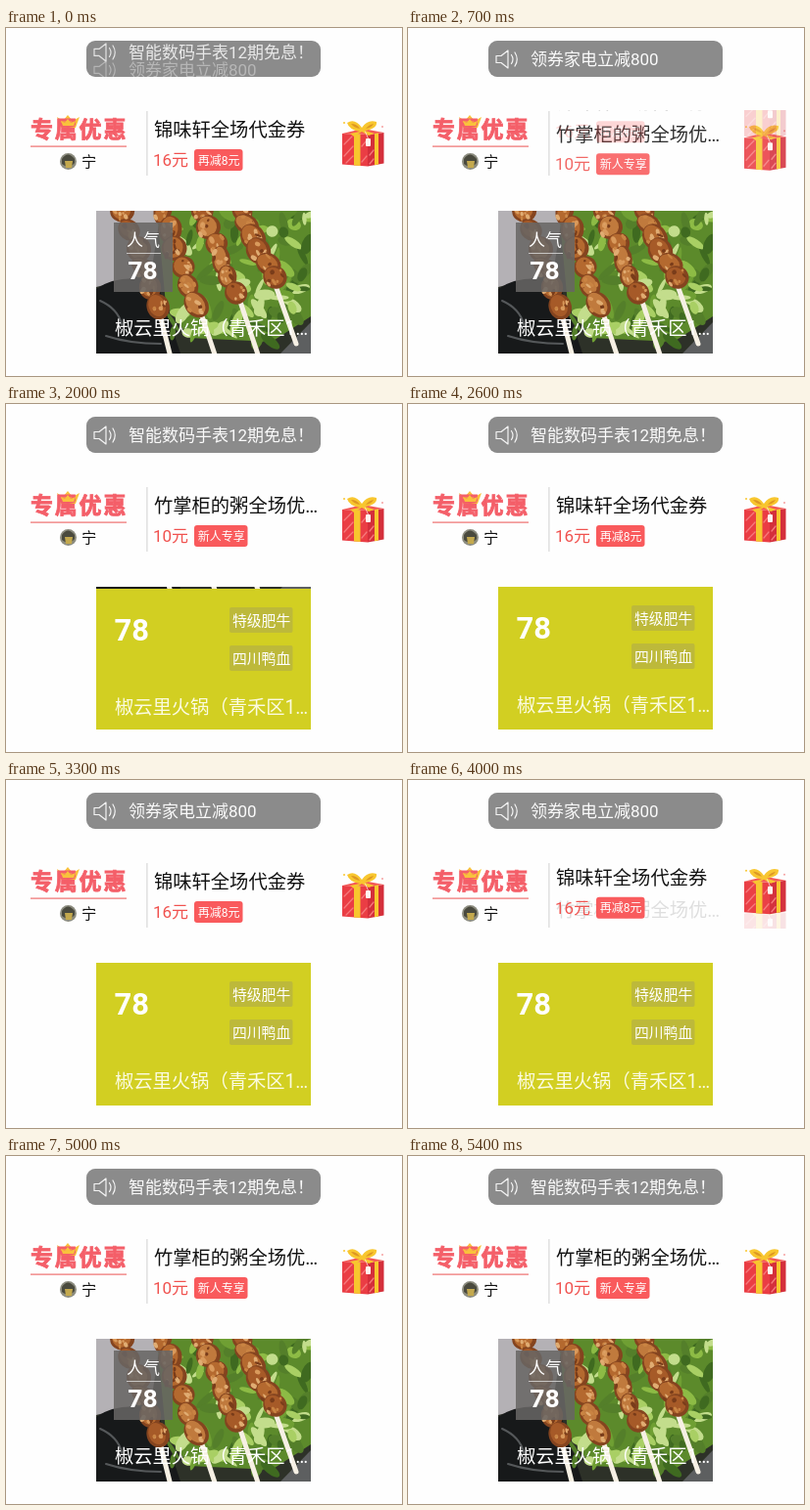
An HTML page for the animation above (5.5 s loop, 404x356 px).

```html
<!DOCTYPE html>
<html lang="zh-CN">
<head>
<meta charset="utf-8">
<title>Vertical flippers</title>
<style>
html, body { margin: 0; width: 100%; height: 100%; overflow: hidden; background: #fefefe; }
svg { display: block; }
text { font-family: Roboto, "Noto Sans CJK SC", "Noto Sans CJK", sans-serif; white-space: pre; }
</style>
</head>
<body>
<svg id="stage" width="404" height="356" viewBox="0 0 404 356"></svg>
<script>
const LOOP = 5500, STEP = 100;

const text = (x, y, size, fill, str, extra = '') =>
  `<text x="${x}" y="${y}" font-size="${size}" fill="${fill}" ${extra}>${str}</text>`;
const rect = (x, y, w, h, fill, r = 0) =>
  `<rect x="${x}" y="${y}" width="${w}" height="${h}" rx="${r}" fill="${fill}"/>`;
const path = (d, fill, extra = '') => `<path d="${d}" fill="${fill}" ${extra}/>`;
const line = (d, stroke, width) =>
  path(d, 'none', `stroke="${stroke}" stroke-width="${width}" stroke-linecap="round" stroke-linejoin="round"`);
const blob = (x, y, rx, ry, fill, turn = 0) =>
  `<ellipse rx="${rx}" ry="${ry}" fill="${fill}" transform="translate(${x} ${y}) rotate(${turn})"/>`;
const group = (items) => items.map(s => `<g>${s}</g>`).join('');
const clip = (id, x, y, w, h, r = 0) =>
  `<clipPath id="${id}">${rect(x, y, w, h, '#000', r)}</clipPath>`;

let seed = 7;
const rnd = (lo, hi) => {
  seed = (seed * 16807) % 2147483647;
  return lo + (hi - lo) * seed / 2147483647;
};
const pick = list => list[Math.floor(rnd(0, list.length))];

const notice = (str) =>
  line('M90 28.5h5l7-5.5v18l-7-5.5h-5z', '#f4f4f4', 1.2) +
  line('M105.5 27.5q3 4.5 0 9M109 25q4.5 7 0 14', '#f4f4f4', 1.2) +
  text(125, 38.3, 17, '#fafafa', str);

function gift() {
  const gold = '#f8c62e';
  return path('M343 108l26 1v32.5l-26-2z', '#ea3d44') +
    path('M369 109l16.5-2v31.5l-16.5 3z', '#d42f3b') +
    path('M343 108l21-5 21.5 4-16.5 2z', '#f45855') +
    line('M345 119l8-8M345 131l9-10M347 138l7-7M363 121l5-6M363 137l5-6M371 130l4-5M371 139l4-5', '#f5797c', 1.3) +
    path('M355 108.5h6.5v32.4l-6.5-.5zM376 108l4-.5v32l-4 .7z', gold) +
    path('M361 106q-11-2-13-9 8-5 15 5 6-9 15-6 1 7-12 9l10 3-6 2-7-4-8 5-4-3z', gold) +
    path('M352 98q6 0 9 5-6-1-9-5zM375 98q-5 1-8 5 6-1 8-5z', '#dd9623') +
    rect(367, 113, 5, 8, '#fff4ef', 1) +
    line('M369.5 113l-3-7', '#fff4ef', .7) +
    `<circle cx="345" cy="97" r="1" fill="${gold}"/><circle cx="384" cy="101" r="1" fill="#f4a0a0"/>`;
}

const coupon = (title, price, tag, tagWidth) =>
  text(151, 111.3, 19.3, '#111', title) +
  text(150, 141, 17, '#f0524f', price) +
  rect(192, 124, tagWidth, 22, '#f95a5c', 3) +
  text(195.7, 139.6, 12, '#fff', tag) + gift();

// Lumps of grilled meat on pale sticks: meat start, meat end, stick end.
function skewers() {
  const rows = [
    [26, 0, 63, 98, 76, 150], [66, 0, 104, 96, 122, 150],
    [106, 0, 144, 84, 166, 150], [148, 0, 180, 68, 204, 136]
  ];
  let out = '';
  for (const [x0, y0, x1, y1, x2, y2] of rows) {
    out += line(`M${x1} ${y1}L${x2} ${y2}`, '#f6f0e4', 5);
    const lean = Math.atan2(y1 - y0, x1 - x0) * 180 / Math.PI;
    for (let k = 0; k < 6; k++) {
      const x = x0 + (x1 - x0) * k / 5 + rnd(-3, 3), y = y0 + (y1 - y0) * k / 5;
      const turn = lean + rnd(-35, 35), rx = rnd(11, 15), ry = rnd(9, 13);
      out += blob(x, y, rx, ry, '#84441f', turn) +
        blob(x - 1, y - 1, rx - 2, ry - 3, pick(['#b4692f', '#a65a28', '#c07a3d']), turn);
      for (let j = 0; j < 7; j++)
        out += blob(x + rnd(-8, 8), y + rnd(-8, 8), rnd(1, 4), rnd(1, 2.5),
          pick(['#d99a5c', '#c98443', '#793c1a', '#e0ac72']), turn + rnd(-40, 40));
    }
  }
  return out;
}

function plate() {
  let out = rect(0, 0, 219, 146, '#2d3128') +
    path('M0 0h66l-10 64-56 14z', '#b4b1b5') +
    path('M0 80q22-16 62-8l24 74H0z', '#17191a') +
    line('M4 92q18 8 22 24M10 128q24 8 56 8', '#55585a', 2) +
    path('M62 0h157v108l-40 26-84-4-24-34z', '#5c8a2b');
  for (let i = 0; i < 110; i++) {
    const x = rnd(78, 219), y = rnd(0, 136 - Math.max(0, x - 180) * .7);
    out += blob(x, y, rnd(5, 13), rnd(2, 6),
      pick(['#8dbb45', '#6f9f33', '#a9cf64', '#3f6a20', '#547f2a', '#c3dd8c']), rnd(0, 180));
  }
  return out + path('M188 146l31-32v32z', '#5d5f60');
}

const cardTitle = (y, fill) => text(19, y, 19.3, fill, '椒云里火锅（青禾区1…');

const photoCard = () => `<g clip-path="url(#slide)">${plate()}${skewers()}</g>` +
  rect(18, 12, 60, 71, 'rgba(104,102,101,.86)') +
  text(48, 36.2, 17, '#fff', '人气', 'text-anchor="middle"') +
  rect(31, 43, 35, .8, '#ddd') +
  text(47.5, 70.3, 26.5, '#fff', '78', 'text-anchor="middle" font-weight="700"') +
  cardTitle(127.4, '#fff');

const tagBox = (y, str) =>
  rect(136, y, 64.5, 26, '#bdb93a', 2) + text(139, y + 18.8, 14.8, '#fff', str);

const plainCard = () => rect(0, 0, 219, 146, '#d2cf22') +
  text(18.5, 53, 31, '#fff', '78', 'font-weight="700"') +
  tagBox(19, '特级肥牛') + tagBox(58, '四川鸭血') + cardTitle(128.2, '#fbfbe0');

document.getElementById('stage').innerHTML =
  `<defs>${clip('bar', 82, 13, 239, 37, 9)}${clip('row', 146, 84, 250, 68)}` +
  `${clip('card', 92, 187, 219, 146)}${clip('slide', 0, 0, 219, 146)}</defs>` +
  rect(0, 0, 404, 356, '#fefefe') +
  rect(82, 13, 239, 37, '#8b8b8b', 9) +
  `<g clip-path="url(#bar)"><g id="notices">${group([
    notice('智能数码手表12期免息！'), notice('领券家电立减800')])}</g></g>` +
  path('M52 91l6 4 5-6 5 6 7-4-4 11H56z', '#f9c23c') +
  text(25, 112.2, 23, '#f45f69', '专属优惠',
    'font-weight="900" letter-spacing="1.8" stroke="#f45f69" stroke-width=".8"') +
  path('M56 95l4 2 3-4 3 4 5-2-2 5H58z', '#f9c23c') +
  rect(25, 120.5, 98, 1.2, '#f0706f') +
  '<circle cx="63.5" cy="136.5" r="8.5" fill="#8d8d80"/>' +
  path('M57 134q6-9 13 0v4q-6 7-13 1z', '#4a4a3e') +
  path('M60 136h8l-1 7h-6z', '#c4a94e') +
  text(77, 142.2, 15.3, '#111', '宁') +
  rect(143.3, 85, 1.2, 66, '#d8d8d8') +
  `<g clip-path="url(#row)"><g id="coupons">${group([
    coupon('锦味轩全场代金券', '16元', '再减8元', 49.5),
    coupon('竹掌柜的粥全场优…', '10元', '新人专享', 54.5)])}</g></g>` +
  `<g clip-path="url(#card)"><g transform="translate(92 187)"><g id="cards">${group([
    photoCard(), plainCard()])}</g></g></g>`;

// Two views take turns: every period one slides out upwards as the other rises in.
function makeFlipper(id, { first, period, duration, distance, fade }) {
  const box = document.getElementById(id), views = [...box.children];
  const place = (view, y, alpha) => {
    view.setAttribute('transform', `translate(0 ${y})`);
    view.setAttribute('opacity', alpha);
  };
  return t => {
    const turn = Math.floor((t - first) / period);
    const x = turn < 0 ? 1 : Math.min(1, (t - first - turn * period) / duration);
    const p = (1 - Math.cos(Math.PI * x)) / 2;
    const next = views[(turn + 1) % 2], last = views[1 - (turn + 1) % 2];
    place(next, (1 - p) * distance, fade ? p : 1);
    place(last, -p * distance, fade ? 1 - p * p : +(p < 1));
    box.append(next, last);
  };
}

const flippers = [
  makeFlipper('notices', { first: -129, period: 1385, duration: 300, distance: 18, fade: true }),
  makeFlipper('coupons', { first: 470, period: 1730, duration: 300, distance: 33, fade: true }),
  makeFlipper('cards', { first: 1283, period: 2733, duration: 775, distance: 146, fade: false })
];

function render(now) {
  const t = Math.floor((now % LOOP) / STEP) * STEP;
  flippers.forEach(flip => flip(t));
}

const begin = performance.now();
function tick() {
  render(performance.now() - begin);
  requestAnimationFrame(tick);
}
tick();
</script>
</body>
</html>
```
